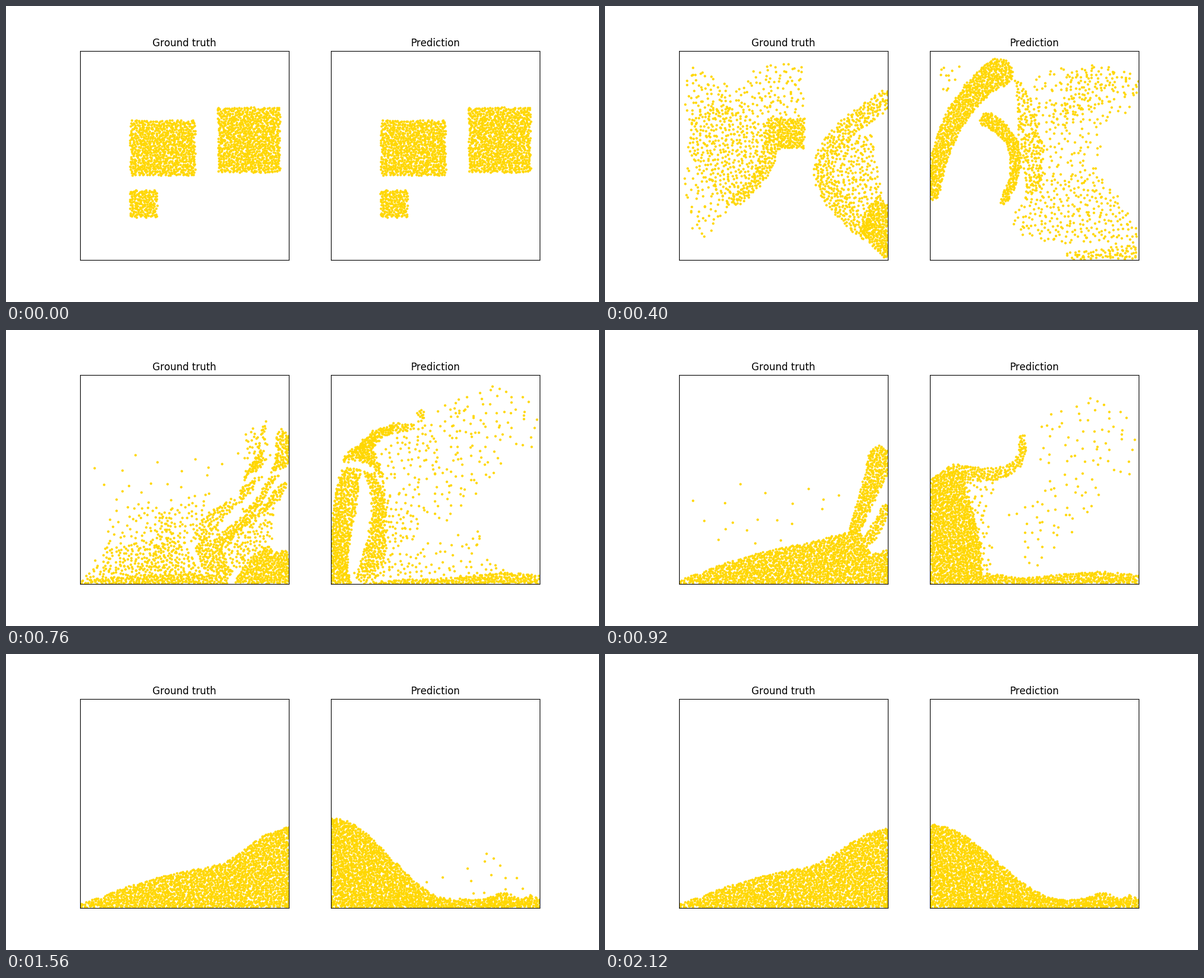
Animation, 1000 px wide and 500 px high, one loop 2.14 s. Source, as a matplotlib script:

```python
import numpy as np
import matplotlib.pyplot as plt
from matplotlib.animation import FuncAnimation
from matplotlib.path import Path

plt.rcParams["text.kerning_factor"] = 6

FRAMES, INTERVAL = 107, 20
TIMES = np.array([0, 9, 20, 30, 46, 62, 78, 106])
SIZE = 352.27                       # panel side in pixels
TOP, FLOOR = 76.36, 428.64
LEFT, RIGHT = 125.0, 547.73
COUNT = 1900
rng = np.random.default_rng(4)

# evenly spread, slightly shaken points that fill one panel
k = np.arange(1, 40001)
SPREAD = np.column_stack([k * 0.7548776662 % 1, k * 0.5698402910 % 1]) * SIZE
SPREAD += rng.normal(0, 0.75, SPREAD.shape) + [LEFT, TOP]


# A region is a share of the grains and a test for points inside it.
def patch(share, *xy):
    return share, Path(np.reshape(xy, (-1, 2))).contains_points


def box(share, x0, y0, x1, y1):
    return patch(share, x0, y0, x1, y0, x1, y1, x0, y1)


def band(share, r0, r1, *xy):
    """Thick curve through a few points, its half width going from r0 to r1."""
    mid = np.reshape(xy, (-1, 2))
    t = np.linspace(0, 1, 40)
    curve = np.polyfit(np.linspace(0, 1, len(mid)), mid, len(mid) - 1)
    line = np.column_stack([np.polyval(c, t) for c in curve.T])
    radius = r0 + (r1 - r0) * t

    def inside(p):
        mask = np.zeros(len(p), bool)
        for q, r in zip(line, radius):
            mask |= ((p - q) ** 2).sum(1) < r * r
        return mask
    return share, inside


def ease(u):
    u = np.clip(u, 0, 1)
    return u * u * (3 - 2 * u)


def slope(rise, start, width, share=1):
    """Heap rising to the right, with one further step up or down."""
    def inside(p):
        u = (p[:, 0] - LEFT) / SIZE
        height = (6 + 102 * u + 8 * np.sin(np.pi * np.minimum(u / 0.65, 1))
                  + rise * ease((u - start) / width))
        return p[:, 1] > FLOOR - height
    return share, inside


def hill(peak, width, share=1):
    """Heap against the left wall, running out into a thin layer."""
    def inside(p):
        v = p[:, 0] - RIGHT
        height = (14 + 12 * np.exp(-((v - 290) / 22) ** 2)
                  + 8 * np.exp(-((v - 337) / 10) ** 2)
                  + peak * (1 + np.cos(np.pi * np.clip(v / width, 0, 1))) / 2)
        return p[:, 1] > FLOOR - height
    return share, inside


def fill(n, inside, x0):
    """The first n spread points inside; thin areas get shaken more."""
    pts = SPREAD + [x0 - LEFT, 0]
    idx = np.flatnonzero(inside(pts))[:n]
    gap = SIZE / np.sqrt(idx[-1] + 1)
    out = pts[idx]
    if gap > 4.6:
        out = out + rng.normal(0, 0.22 * gap, out.shape)
    return out


def cloud(n, regions, x0):
    shares = np.array([s for s, _ in regions], float)
    ends = np.round(np.cumsum(shares) / shares.sum() * n).astype(int)
    return np.vstack([fill(m, inside, x0) for m, (_, inside)
                      in zip(np.diff(ends, prepend=0), regions)])


def kd(z, idx, axis=0):
    if len(idx) < 2:
        return idx
    idx = idx[np.argsort(z[idx, axis])]
    h = len(idx) // 2
    return np.concatenate([kd(z, idx[:h], 1 - axis), kd(z, idx[h:], 1 - axis)])


def match(a, b):
    """Order of b that pairs it with a over short ways."""
    n = len(a)
    order = np.empty(n, int)
    order[kd(a, np.arange(n))] = kd(b, np.arange(n))
    h = n // 2
    for _ in range(2200):
        p = rng.permutation(n)
        i, j = p[:h], p[h:2 * h]
        gain = ((a[i] - a[j]) * (b[order[j]] - b[order[i]])).sum(1) > 0
        i, j = i[gain], j[gain]
        order[i], order[j] = order[j], order[i]
    return order


def settle(a, b):
    """Like match, but grains present in both clouds stay at rest."""
    unit = np.array([1, 1j])
    _, ia, ib = np.intersect1d(a @ unit, b @ unit, return_indices=True)
    ra = np.setdiff1d(np.arange(len(a)), ia)
    rb = np.setdiff1d(np.arange(len(b)), ib)
    order = np.empty(len(a), int)
    order[ia] = ib
    order[ra] = rb[match(a[ra], b[rb])]
    return order


def fall(drops, rest, drift, t):
    """Free flight of single grains, given where they are at step 46."""
    x, y = drops.T
    s = (t - 46) / 16
    speed = 49.5 + 0.4 * (y - 104)
    return np.column_stack([x + drift(x) * s,
                            np.minimum(y + speed * s + 28.5 * s * s, rest)])


def smooth(keys):
    """Monotone cubic through the key positions, one row per frame."""
    h = np.diff(TIMES)[:, None, None]
    d = np.diff(keys, axis=0) / h
    prod, total = d[1:] * d[:-1], d[1:] + d[:-1]
    inner = np.where(prod > 0, 2 * prod / np.where(prod > 0, total, 1), 0)
    m = np.concatenate([d[:1], inner, d[-1:]])
    rows = []
    for t in range(FRAMES):
        i = min(np.searchsorted(TIMES, t, side="right") - 1, len(TIMES) - 2)
        w = h[i]
        u = (t - TIMES[i]) / w
        rows.append(keys[i] * (1 + 2 * u) * (1 - u) ** 2
                    + keys[i + 1] * u * u * (3 - 2 * u)
                    + w * (m[i] * u * (1 - u) ** 2 + m[i + 1] * u * u * (u - 1)))
    return np.array(rows)


# three blocks at the start, then shortly after they set off
BLOCKS = [box(810, 209, 193, 319, 286), box(914, 357, 171, 462, 281),
          box(176, 208, 310, 255, 358)]
a, b, c = [fill(n, inside, LEFT) for n, inside in BLOCKS]
START = np.vstack([a, b, c])
SHOVED = np.vstack([(a - [208, 239]) * [0.85, 1.15] + [136, 231],
                    (b - [356, 225]) * [0.9, 1.08] + [380, 233],
                    c + [37, -65]])

truth_burst = [
    patch(390, 140, 195, 200, 165, 232, 185, 285, 205, 262, 290, 205, 340, 142, 255),
    band(190, 14, 10, 282, 200, 270, 270, 222, 326),
    patch(100, 215, 140, 270, 97, 334, 92, 334, 188, 225, 185),
    patch(70, 137, 98, 212, 135, 220, 180, 140, 195),
    patch(55, 128, 270, 190, 285, 210, 345, 172, 386, 140, 376),
    box(176, 290, 189, 336, 241),
    band(460, 17, 17, 470, 160, 385, 232, 372, 300, 440, 378),
    patch(180, 395, 232, 450, 210, 455, 260, 465, 320, 440, 350, 385, 310),
    patch(260, 477, 335, 477, 427, 468, 425, 430, 380, 440, 345, 460, 320),
]
truth_arcs = [
    patch(330, 440, 364, 477, 374, 477, 429, 385, 429, 412, 390),
    band(470, 16, 11, 468, 168, 428, 245, 356, 305, 362, 405),
    patch(120, 365, 300, 435, 262, 445, 345, 400, 405, 362, 380),
    band(230, 17, 7, 400, 200, 352, 224, 333, 262, 328, 330),
    patch(50, 332, 138, 425, 126, 428, 205, 350, 190),
    patch(110, 147, 160, 235, 200, 325, 150, 325, 310, 150, 310),
    patch(90, 225, 212, 238, 212, 285, 400, 230, 390),
    patch(215, 150, 300, 280, 300, 345, 408, 130, 412, 150, 370),
    patch(250, 126, 422, 290, 405, 350, 408, 362, 429, 126, 429),
]
truth_tower = [
    slope(-50, 0.85, 0.08, 1480),
    band(330, 21, 10, 464, 216, 446, 270, 421, 335),
    band(80, 9, 9, 475, 302, 445, 354),
]
truth_shapes = [truth_burst, truth_arcs, truth_tower, [slope(58, 0.68, 0.3)],
                [slope(30, 0.64, 0.3)], [slope(27, 0.62, 0.3)]]
truth_drops = cloud(19, [patch(1, 150, 265, 400, 258, 415, 310, 330, 340, 180, 390)],
                    LEFT)

guess_burst = [
    band(720, 24, 12, 664, 112, 590, 190, 552, 315),
    patch(12, 560, 103, 600, 102, 575, 160),
    band(290, 13, 7, 645, 192, 691, 248, 672, 328),
    patch(190, 688, 120, 715, 140, 740, 240, 735, 310, 712, 320, 700, 230),
    patch(200, 700, 190, 735, 110, 830, 96, 898, 125, 898, 160, 835, 215,
          832, 280, 715, 300),
    patch(270, 712, 290, 838, 280, 898, 375, 898, 400, 735, 400, 685, 375),
    patch(80, 770, 418, 897, 402, 899, 428, 790, 428),
]
guess_ring = [
    band(720, 15, 10, 560, 429, 562, 300, 612, 172, 698, 120),
    band(400, 14, 10, 633, 165, 660, 245, 653, 320, 626, 385),
    patch(25, 590, 412, 617, 390, 655, 390, 640, 418),
    patch(150, 660, 170, 700, 130, 760, 130, 800, 240, 800, 320, 730, 345, 660, 320),
    patch(50, 655, 340, 808, 350, 835, 395, 655, 405),
    patch(20, 765, 100, 845, 90, 898, 125, 895, 170, 840, 215),
    patch(260, 610, 429, 700, 421, 835, 406, 898, 414, 899, 429),
]
guess_wall = [
    patch(1130, 549, 250, 575, 234, 602, 238, 632, 355, 640, 429, 549, 429),
    band(190, 13, 5, 588, 238, 680, 236, 703, 178),
    patch(45, 605, 255, 672, 255, 640, 285, 658, 405, 635, 405),
    patch(310, 640, 410, 700, 418, 835, 407, 899, 413, 899, 429, 640, 429),
]
guess_shapes = [guess_burst, guess_ring, guess_wall,
                [hill(156, 175, 1720), band(45, 6, 6, 692, 292, 703, 330, 685, 382)],
                [hill(138, 207)], [hill(127, 230)]]
guess_drops = cloud(108, [
    patch(56, 728, 225, 745, 142, 820, 100, 897, 150, 893, 255, 800, 230),
    patch(52, 688, 300, 735, 245, 810, 240, 856, 275, 802, 316, 725, 408, 700, 386),
], RIGHT)


def motion(shapes, drops, drift, x0):
    n = COUNT - len(drops)
    rest = rng.uniform(412, 427, len(drops))
    shift = [x0 - LEFT, 0]
    now = cloud(n, shapes[0], x0)
    first = np.vstack([now, fall(drops, rest, drift, TIMES[2])])
    order = match(first, SHOVED + shift)
    keys = [START[order] + shift, SHOVED[order] + shift, first]
    for t, shape in zip(TIMES[3:], shapes[1:]):
        new = cloud(n, shape, x0)
        pair = settle if t > 46 else match
        now = new[pair(now, new)]
        keys.append(np.vstack([now, fall(drops, rest, drift, t)]))
    path = smooth(np.array(keys))
    for t in range(TIMES[2], FRAMES):
        path[t, n:] = fall(drops, rest, drift, t)
    return np.clip(path, [x0 + 1.5, TOP + 1], [x0 + SIZE - 1, FLOOR - 0.5])


truth = motion(truth_shapes, truth_drops, lambda x: 0.25 * (x - 150), LEFT)
guess = motion(guess_shapes, guess_drops,
               lambda x: -4 - np.clip(0.3 * (810 - x), 0, 26), RIGHT)

fig, axes = plt.subplots(1, 2, figsize=(10, 5), dpi=100)
panels = []
for ax, title, path, x0 in zip(axes, ("Ground truth", "Prediction"),
                               (truth, guess), (LEFT, RIGHT)):
    ax.set_title(title)
    ax.set_xlim(x0, x0 + SIZE)
    ax.set_ylim(FLOOR, TOP)
    ax.set_xticks([])
    ax.set_yticks([])
    ax.set_aspect(1)
    panels.append((ax.plot([], [], "o", ms=2, color="gold")[0], path))


def update(i):
    for line, path in panels:
        line.set_data(path[i, :, 0], path[i, :, 1])
    return [line for line, _ in panels]


anim = FuncAnimation(fig, update, frames=FRAMES, interval=INTERVAL, repeat=True)
plt.show()
```
